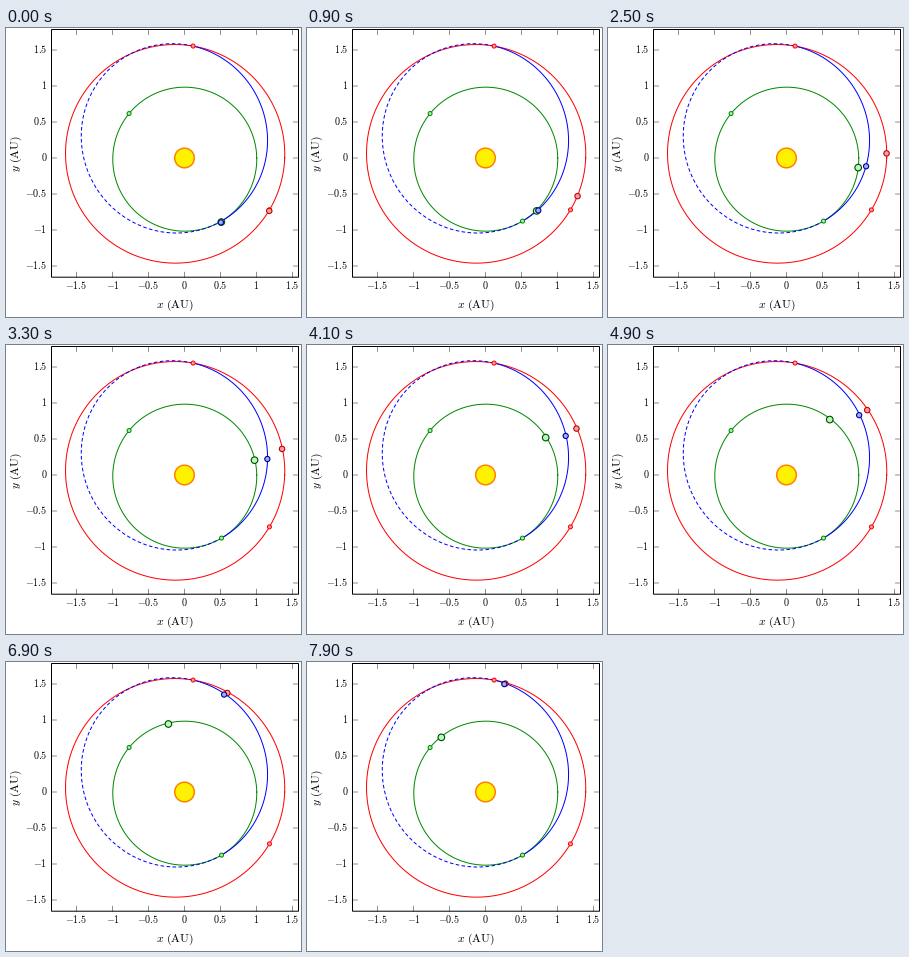
These frames come from a looping animation (295 px wide and 289 px high, 8000 ms). A matplotlib script:

```python
import numpy as np
import matplotlib.pyplot as plt
from matplotlib.animation import FuncAnimation
from matplotlib.patches import Circle, Rectangle

W, H, DPI = 295, 289, 64
PT = 72 / DPI                    # points per pixel
X0, Y0, AU = 178.5, 130.0, 72    # position of the sun, pixels per AU
LEFT, TOP, RIGHT, BOTTOM = 45.5, 1.5, 292.5, 249.2
YEAR = 365.25

plt.rcParams["mathtext.fontset"] = "cm"


def to_px(x, y):
    return X0 + AU * x, Y0 - AU * y


class Orbit:
    """Kepler ellipse around the sun; angles in degrees, distances in AU."""

    def __init__(self, a, e, peri, start):
        self.a, self.e, self.peri = a, e, np.radians(peri)
        self.ratio = np.sqrt((1 - e) / (1 + e))
        nu = np.radians(start) - self.peri
        ecc = 2 * np.arctan(self.ratio * np.tan(nu / 2))
        self.m0 = ecc - e * np.sin(ecc)

    def radius(self, lon):
        nu = np.radians(lon) - self.peri
        return self.a * (1 - self.e ** 2) / (1 + self.e * np.cos(nu))

    def point(self, lon):
        r, t = self.radius(lon), np.radians(lon)
        return to_px(r * np.cos(t), r * np.sin(t))

    def at(self, days):
        m = self.m0 + 2 * np.pi * days / YEAR / self.a ** 1.5
        ecc = m
        for _ in range(12):
            ecc -= (ecc - self.e * np.sin(ecc) - m) / (1 - self.e * np.cos(ecc))
        nu = 2 * np.arctan(np.tan(ecc / 2) / self.ratio)
        return self.point(np.degrees(nu + self.peri))


def transfer(lon1, r1, lon2, r2, peri, start):
    """Ellipse with the given perihelion that passes through two points."""
    c1, c2 = np.cos(np.radians([lon1 - peri, lon2 - peri]))
    e = (r2 - r1) / (r1 * c1 - r2 * c2)
    a = r1 * (1 + e * c1) / (1 - e ** 2)
    return Orbit(a, e, peri, start)


DEPART, ARRIVE, FLIGHT = -59.6, 85.6, 202
earth = Orbit(1.0, 0.0167, 102.9, DEPART)
mars = Orbit(1.5237, 0.0934, -23.96, -31.4)
craft = transfer(DEPART, earth.radius(DEPART), ARRIVE, mars.radius(ARRIVE),
                 -62.8, -60.0)

fig = plt.figure(figsize=(W / DPI, H / DPI), dpi=DPI, facecolor="white")
ax = fig.add_axes([0, 0, 1, 1])
ax.set(xlim=(0, W), ylim=(H, 0))
ax.axis("off")


def line(x, y, color, width=1.0, **kw):
    ax.plot(x, y, color=color, lw=width * PT, snap=False, **kw)


def disc(pos, r, face, edge, width=1.0, z=5):
    c = Circle(pos, r, fc=face, ec=edge, lw=width * PT, zorder=z)
    return ax.add_patch(c)


def label(x, y, s, size, **kw):
    ax.text(x, y, s, fontsize=size * PT, color="black", **kw)


# axes box, ticks and labels
TICK = 5
for v in np.arange(-1.5, 1.6, 0.5):
    x, y = to_px(v, v)
    for y1, y2 in ((BOTTOM, BOTTOM - TICK), (TOP, TOP + TICK)):
        line([x, x], [y1, y2], "0.45", 0.8, zorder=1)
    for x1, x2 in ((LEFT, LEFT + TICK), (RIGHT, RIGHT - TICK)):
        line([x1, x2], [y, y], "0.45", 0.8, zorder=1)
    text = f"${v:g}$"
    label(x, 261.2, text, 10, ha="center", va="baseline")
    label(41.3, y + 3.1, text, 10, ha="right", va="baseline")
label(168.3, 277.8, r"$x\ \mathrm{(AU)}$", 11.7, ha="center", va="center")
label(10, 125.2, r"$y\ \mathrm{(AU)}$", 11.7, ha="center", va="center",
      rotation=90)
ax.add_patch(Rectangle((LEFT, TOP), RIGHT - LEFT, BOTTOM - TOP, fill=False,
                       ec="black", lw=PT, snap=False, zorder=4))

# orbits
RED, GREEN, BLUE = "#ff0000", "#008a00", "#0000ff"
full = np.linspace(0, 360, 721)
line(*mars.point(full), RED, zorder=2)
line(*earth.point(full), GREEN, zorder=2)
line(*craft.point(np.linspace(DEPART, ARRIVE, 300)), BLUE, zorder=3)
line(*craft.point(np.linspace(ARRIVE, DEPART + 360, 400)), BLUE, zorder=3,
     dashes=(3.6, 2.4), dash_capstyle="butt")

# sun, then the departure and arrival places
disc((X0, Y0), 9.8, "#fff200", "#ff8000", 1.5)
for days in (0, FLIGHT):
    disc(earth.at(days), 2, "#a6f0a6", GREEN)
disc(mars.at(0), 2, "#ff9c9c", RED)
disc(mars.point(ARRIVE), 2, "#ff9c9c", RED)

# moving bodies sit slightly below their orbits
SHIFT = np.array([-0.2, 1.0])
bodies = [
    (earth, disc((0, 0), 3.3, "#b4ffb4", "#004800", 1.1, z=6)),
    (mars, disc((0, 0), 2.7, "#ffa0a0", "#c00000", 1.1, z=7)),
    (craft, disc((0, 0), 2.6, "#98b0ff", "#000090", 1.1, z=8)),
]

TICK_MS, LOOP_MS = 100, 8000
HOLD_MS, STEP_MS, STEP_DAYS = 500, 200, 4.98


def draw(i):
    t = i * TICK_MS
    step = 0 if t < HOLD_MS else 1 + (t - HOLD_MS) // STEP_MS
    for orbit, marker in bodies:
        marker.center = orbit.at(step * STEP_DAYS) + SHIFT
    return [marker for _, marker in bodies]


anim = FuncAnimation(fig, draw, frames=LOOP_MS // TICK_MS, interval=TICK_MS,
                     init_func=lambda: draw(0), repeat=True, repeat_delay=0)
plt.show()
```
